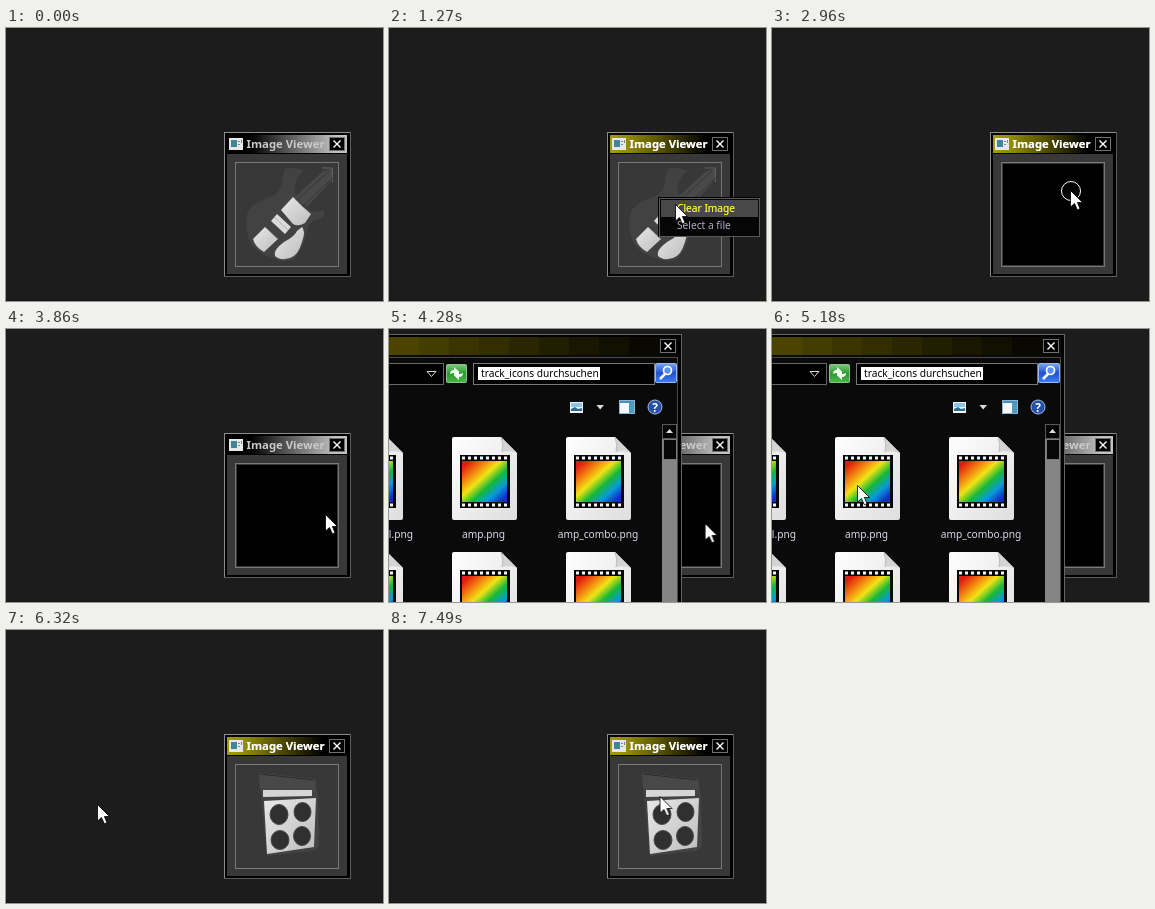
Recreate the animation shown at these times as an HTML page. Size 377 px wide and 273 px high, loop 7.99 s.

```html
<!DOCTYPE html>
<html lang="en">
<head>
<meta charset="utf-8">
<title>Image viewer demo</title>
<style>
  html, body { margin: 0; width: 100%; height: 100%; overflow: hidden; background: #1c1c1c; }
  svg { display: block; width: 100%; height: 100%; }
  text { font: 10.2px "Noto Sans", "Open Sans", sans-serif; fill: #dcd8e8; white-space: pre; }
  .title { font-size: 11.35px; font-weight: bold; }
  .crisp { shape-rendering: crispEdges; }
  .mid { text-anchor: middle; }
</style>
</head>
<body>
<svg viewBox="0 0 377 273">
  <defs>
    <linearGradient id="idle">
      <stop offset=".2" stop-color="#000"/><stop offset=".45" stop-color="#484848"/><stop offset=".9" stop-color="#c0c0c0"/>
    </linearGradient>
    <linearGradient id="active">
      <stop offset="0" stop-color="#a29c00"/><stop offset=".15" stop-color="#928c00"/><stop offset=".8" stop-color="#000"/>
    </linearGradient>
    <linearGradient id="metal" x2="1" y2="1">
      <stop offset="0" stop-color="#e8e8e8"/><stop offset="1" stop-color="#bdbdbd"/>
    </linearGradient>
    <linearGradient id="rainbow" x2="1" y2="1">
      <stop offset=".08" stop-color="#e01c10"/><stop offset=".28" stop-color="#f48a10"/>
      <stop offset=".43" stop-color="#f0e414"/><stop offset=".6" stop-color="#16b838"/>
      <stop offset=".76" stop-color="#0a9ad8"/><stop offset=".92" stop-color="#1230c8"/>
    </linearGradient>
    <linearGradient id="paper" x2="1" y2="1">
      <stop offset="0" stop-color="#fff"/><stop offset="1" stop-color="#dedede"/>
    </linearGradient>
    <linearGradient id="green" x2="0" y2="1">
      <stop offset="0" stop-color="#7cc878"/><stop offset=".5" stop-color="#2c9a30"/><stop offset="1" stop-color="#48b848"/>
    </linearGradient>
    <linearGradient id="blue" x2="0" y2="1">
      <stop offset="0" stop-color="#78a8f0"/><stop offset=".5" stop-color="#2450d0"/><stop offset="1" stop-color="#3c80f0"/>
    </linearGradient>

    <g id="close">
      <rect class="crisp" x=".5" y=".5" width="15" height="13" fill="#000" stroke="#707070"/>
      <path d="M4.5 3.5l7 7m0-7l-7 7" stroke="#fff" stroke-width="1.4"/>
    </g>

    <g id="file">
      <path d="M2 0H49L65 16V81Q65 83 63 83H2Q0 83 0 81V2Q0 0 2 0Z" fill="url(#paper)"/>
      <path d="M49 0Q52 8 50 15Q58 13 65 16Z" fill="#d4d4d4"/>
      <path d="M49 0Q52 8 50 15" fill="none" stroke="#aaa" stroke-width=".7"/>
      <rect x="8" y="18" width="50" height="53" fill="#080808"/>
      <path d="M10 21H57M10 68H57" stroke="#f4f4f4" stroke-width="3" stroke-dasharray="3 3"/>
      <rect x="10" y="24" width="45" height="41" fill="url(#rainbow)"/>
    </g>
  </defs>

  <rect width="377" height="273" fill="#1c1c1c"/>
  <rect y="272" width="377" height="1" fill="#171213"/>

  <!-- viewer window -->
  <g class="crisp">
    <rect x="218.5" y="104.5" width="126" height="144" fill="#000" stroke="#5c5c5c"/>
    <path d="M218.5 248V104.5H344" fill="none" stroke="#8c8c8c"/>
    <rect x="221" y="126" width="120" height="120" fill="#383838"/>
    <rect x="221" y="107" width="120" height="18" fill="url(#idle)"/>
    <rect id="lit" x="221" y="107" width="120" height="18" fill="url(#active)"/>
    <rect x="229.5" y="134.5" width="103" height="104" fill="#383838" stroke="#787878"/>
    <rect x="223" y="110" width="14" height="12" fill="#e8e8e8"/>
    <rect x="225" y="112" width="6" height="7" fill="#3f8792"/>
    <path d="M232 113.5H234M232 116.5H234M235.5 112V115" stroke="#7a868c"/>
  </g>
  <text class="title" x="240.5" y="120" style="fill:#cacaca">Image Viewer</text>
  <text id="litText" class="title" x="240.5" y="120" style="fill:#fff">Image Viewer</text>
  <use href="#close" x="323" y="109"/>

  <g id="guitar">
    <path d="M279 141Q288 138 298 143Q287 152 289 165L301 181Q309 186 317 182Q321 188 314 191Q303 192 301 203Q298 221 288 231Q276 236 267 230Q249 225 243 212Q238 196 242 183Q247 175 262 170Q277 164 276 151Z" fill="#424242"/>
    <path d="M288 170L316 144L327 140V151L301 179Z" fill="#494949"/>
    <path d="M316 140H326.5V154" fill="none" stroke="#626262"/>
    <path d="M291 172L323 143M297 178L327 150" stroke="#343434"/>
    <path d="M275 182L287 169L292 174L297 179L305 186L299 195Q292 199 287 196Z" fill="url(#metal)"/>
    <path d="M271 186L285 199L279 206L265 193Z" fill="#dadada"/>
    <path d="M259 199L272 211L258 224Q249 219 247 211Z" fill="url(#metal)"/>
    <path d="M296 199Q300 203 296 214Q292 228 284 230Q274 233 269 228Q267 222 278 214Q288 209 291 203Z" fill="url(#metal)"/>
    <path d="M268 189L282 202M262 202L271 211" stroke="#aaa" stroke-width=".8"/>
  </g>

  <rect id="empty" class="crisp" x="231" y="136" width="100" height="101" fill="#000"/>

  <g id="amp">
    <path d="M253 143L309 149L312 168L313 217L307 221L261 226L255 165Z" fill="#434343"/>
    <path d="M253 143L309 149L310 161L254 159Z" fill="#484848"/>
    <path d="M254 144L308 150" stroke="#2b2b2b"/>
    <path d="M257 160H306V166L257 167Z" fill="#d6d6d6"/>
    <path d="M258 171L310 168L308 217L261 224Z" fill="url(#metal)"/>
    <g fill="#303030" stroke="#484848">
      <ellipse cx="273" cy="184.500" rx="9" ry="10"/>
      <ellipse cx="296.500" cy="182" rx="8.500" ry="9.500"/>
      <ellipse cx="274" cy="210" rx="9" ry="9.500"/>
      <ellipse cx="296" cy="206" rx="8.500" ry="9.500"/>
    </g>
  </g>

  <g id="menu">
    <g class="crisp">
      <rect x="269" y="169" width="102" height="40" fill="#000"/>
      <rect x="270.500" y="170.500" width="100" height="38" fill="#060606" stroke="#5a5a5a"/>
      <rect id="row" x="272" y="172" width="97" height="17" fill="#484848"/>
    </g>
    <text x="288" y="184" style="fill:#b4acc8">Clear Image</text>
    <text id="rowText" x="288" y="184" style="fill:#ff0">Clear Image</text>
    <text x="288" y="201" style="fill:#b4acc8">Select a file</text>
  </g>

  <!-- file dialog -->
  <g id="dialog">
    <g class="crisp">
      <rect y="5" width="293" height="268" fill="#000"/>
      <path d="M0 5.500H292.500V273" fill="none" stroke="#666"/>
      <rect y="8" width="289" height="265" fill="#0a0a0a"/>
      <g id="bar"></g>
      <path d="M0 28.500H288.500V273" fill="none" stroke="#4a4a4a"/>
      <path d="M0 34.500H54.500V55.500H0" fill="#000" stroke="#666"/>
      <rect x="84.500" y="34.500" width="181" height="21" fill="#000" stroke="#777"/>
      <rect x="89" y="38" width="122" height="13" fill="#fff"/>
      <rect x="273" y="95" width="15" height="178" fill="#858585"/>
      <rect x="273.500" y="95.500" width="14" height="14" fill="#050505" stroke="#5a5a5a"/>
      <rect x="274.500" y="110.500" width="13" height="20" fill="#080808" stroke="#7a7a7a"/>
    </g>
    <use href="#close" x="271" y="10"/>
    <path d="M38 42.500H47L42.500 47.500Z" fill="#000" stroke="#d8d8d8"/>
    <rect x="57.500" y="35.500" width="20" height="18" rx="1" fill="url(#green)" stroke="#90c090"/>
    <path d="M61 45Q61 41 65 41V38L70 42.500L65 47V44Q63 44 61 45ZM74 44Q74 48 70 48V51L65 46.500L70 42.500V45Q72 45 74 44Z" fill="#f4fff4"/>
    <rect x="266.500" y="34.500" width="21" height="19" rx="1" fill="url(#blue)" stroke="#9cb8f0"/>
    <path d="M276 45L271 50" stroke="#fff" stroke-width="2.500"/>
    <circle cx="278.500" cy="41.500" r="4" fill="#5c90ec" stroke="#fff" stroke-width="1.700"/>
    <text x="92" y="48" style="fill:#000">track_icons durchsuchen</text>

    <rect x="181" y="73" width="13" height="11" fill="#f0f4f8"/>
    <rect x="182" y="74" width="11" height="4" fill="#8cc4ec"/>
    <path d="M182 82V80L186 78L189 80L193 79V82Z" fill="#2c6c88"/>
    <path d="M207.500 76H215L211.200 80.500Z" fill="#ddd"/>
    <rect x="230.500" y="71.500" width="15" height="13" fill="#f4f8fc" stroke="#8bb4d4"/>
    <path d="M231 73H245" stroke="#4890bc" stroke-width="2"/>
    <rect x="240" y="74" width="5" height="10" fill="#4c9cc0"/>
    <circle cx="266" cy="78" r="7" fill="#2450a8" stroke="#a8bce0"/>
    <text class="mid" x="266" y="82.500" style="fill:#fff;font-size:12px;font-weight:bold">?</text>
    <path d="M277 104H284L280.500 100Z" fill="#ddd"/>

    <rect id="pick" class="crisp" x="43" y="100" width="105" height="114" fill="#484848"/>
    <g id="files"></g>
    <text x="24" y="209" text-anchor="end">l.png</text>
    <text class="mid" x="94.500" y="209">amp.png</text>
    <text id="pickText" class="mid" x="94.500" y="209" style="fill:#ff0">amp.png</text>
    <text class="mid" x="209" y="209">amp_combo.png</text>
  </g>

  <g id="cursor">
    <g id="ring" fill="none">
      <circle r="9.5" stroke="#000" stroke-width="2.2"/>
      <circle r="9.5" stroke="#fff"/>
    </g>
    <path d="M-.5 -.5V16L3.500 12.500L6.300 18.800L9 17.700L6.400 11.500H11.500Z" fill="#fff" stroke="#000" stroke-width=".8"/>
  </g>
</svg>
<script>
const LOOP = 7990;
const $ = id => document.getElementById(id);
const start = document.timeline.currentTime ?? performance.now();

function add(parent, tag, attrs) {
  const el = document.createElementNS('http://www.w3.org/2000/svg', tag);
  for (const name in attrs) el.setAttribute(name, attrs[name]);
  $(parent).append(el);
}

function play(id, frames) {
  $(id).animate(frames, { duration: LOOP, iterations: Infinity }).startTime = start;
}

// Each time flips the part between shown and hidden.
function toggle(ids, shown, ...times) {
  const frames = [0, ...times, LOOP].map((t, i) => ({
    offset: t / LOOP,
    opacity: (Math.min(i, times.length) % 2 === 0) === shown ? 1 : 0,
    easing: 'steps(1, end)'
  }));
  ids.split(' ').forEach(id => play(id, frames));
}

// The dialog's title bar fades in visible bands.
for (let i = 0; i < 9; i++)
  add('bar', 'rect', {
    x: i * 30, y: 8, width: 30, height: 18,
    fill: `rgb(${74 - i * 8}, ${68 - i * 7.5}, 0)`
  });

for (const y of [108, 223])
  for (const x of [-51, 63, 177]) add('files', 'use', { href: '#file', x, y });

toggle('lit litText', false, 920, 3800, 6320);
toggle('guitar', true, 1750);
toggle('empty', false, 1750, 6320);
toggle('amp', false, 6320);
toggle('menu', false, 1040, 1750);
toggle('row rowText', false, 1150);
toggle('dialog', false, 3980, 6320);
toggle('pick pickText', false, 5840, 6320);
toggle('ring', false, 920, 1040, 1630, 1750, 2840, 2900, 2960, 3020, 5840, 5960, 6260, 6320);
toggle('cursor', false, 560);

// time, x, y
const path = [
  [0, 340, 173], [560, 340, 173], [740, 269, 169], [1040, 269, 169],
  [1260, 287, 177], [1330, 287, 177], [1450, 308, 186], [1930, 308, 186],
  [2050, 307, 186], [2480, 307, 186], [2780, 299, 163], [3260, 299, 163],
  [3500, 320, 186], [3980, 320, 186], [4040, 317, 195], [4280, 317, 195],
  [4900, 80, 161], [5060, 86, 157], [5240, 86, 157], [5420, 100, 253],
  [5660, 98, 171], [6320, 98, 171], [6320, 92, 175], [7130, 92, 175],
  [7490, 271.5, 167], [LOOP, 271.5, 167]
];
play('cursor', path.map(([t, x, y]) => ({
  offset: t / LOOP, transform: `translate(${x}px, ${y}px)`
})));
</script>
</body>
</html>
```
